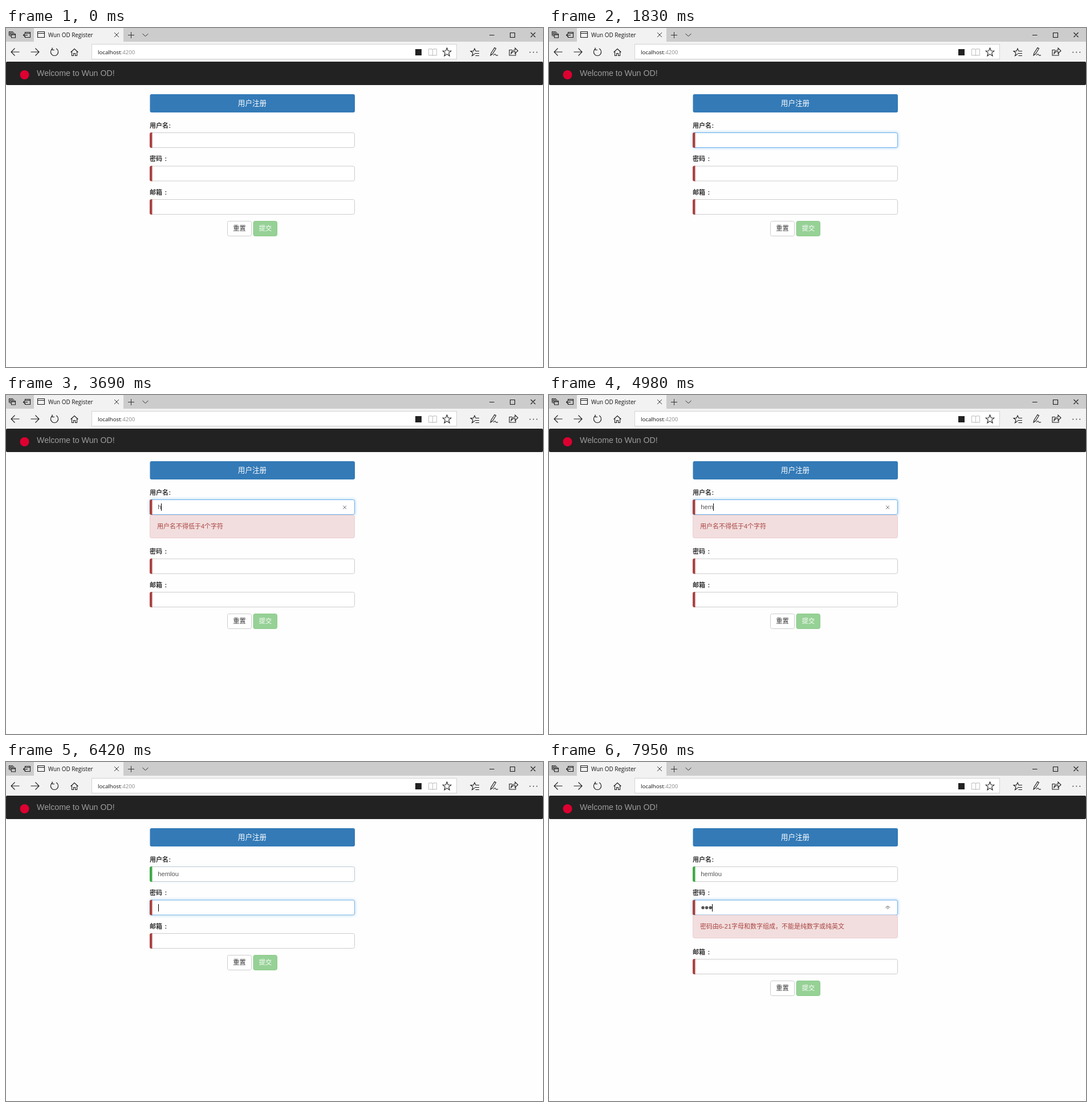
These frames come from a looping animation (942 px wide and 594 px high, 8 s). An HTML page:

```html
<!DOCTYPE html>
<html lang="zh-CN">
<head>
<meta charset="utf-8">
<title>Register form</title>
<style>
  html, body { margin: 0; width: 100%; height: 100%; overflow: hidden; background: #fefefe; }
  svg { display: block; width: 100%; height: 100%; }
  text { font: 11px "Liberation Sans", "Noto Sans CJK SC", "Noto Sans CJK", sans-serif; white-space: pre; }
  .ui { font-family: "Open Sans", "Noto Sans", sans-serif; }
  .mid { text-anchor: middle; }
  .label { font-weight: bold; fill: #333; }
  .icon { fill: none; stroke: #1c1c1c; stroke-width: 1.1; }
</style>
</head>
<body>
<svg viewBox="0 0 942 594" xmlns="http://www.w3.org/2000/svg">
  <defs>
    <filter id="blur" x="-5%" y="-50%" width="110%" height="200%"><feGaussianBlur stdDeviation="2"/></filter>
  </defs>

  <!-- browser chrome -->
  <rect width="942" height="24" fill="#ccc"/>
  <rect y="24" width="942" height="35" fill="#f2f2f2"/>
  <rect x="49" width="157" height="25" fill="#f2f2f2"/>
  <rect id="hover" x="908" y="24" width="34" height="35" fill="#dcdcdc"/>
  <rect x="150.500" y="28.500" width="640" height="26" fill="#fff" stroke="#d2d2d2"/>
  <text class="ui" x="74" y="16" style="font-size:9.9px" fill="#111">Wun OD Register</text>
  <text class="ui" x="161" y="45.500" style="font-size:9.700px" fill="#111">localhost<tspan fill="#8a8a8a">:4200</tspan></text>

  <g class="icon">
    <path d="M5.500 13.500v-7h7M7.500 15v-6.500h7M9.500 10.500h7v6.500h-7zM9.500 12h7"/>
    <path d="M33.500 10v-2.500h9v9h-9v-2.500M33.500 9.500h9M38 12.500h-7.500m2.500-2.500l-2.500 2.500 2.500 2.500"/>
    <path d="M55.500 6.500h12v10h-12zM55.500 9.500h12"/>
    <path d="M190 8l8 8m0-8l-8 8M214 12.500h11M219.500 7v11M239.500 10l5 4.500 5-4.500" stroke="#333" stroke-width="1"/>
    <path d="M848 12.500h8.500M884.500 8.500h8v8h-8zM920.500 8l8 8m0-8l-8 8"/>
    <path d="M23.500 42H9m6.500-6.500L9 42l6.500 6.500M43.500 42H58m-6.500-6.500L58 42l-6.500 6.500"/>
    <path d="M82 36a6.600 6.600 0 1 0 6 0M81 34.500v4h4"/>
    <path d="M113.500 42.500l6.500-6 6.500 6M115.500 41v7.500h3v-4h3v4h3V41"/>
    <path d="M748.500 37.500q-3-1.500-7-.5v11q4-1 7 .5 3-1.500 7-.5V37q-4-1-7 .5zv11" stroke="#c4c4c4"/>
    <path d="M773.500 35l2 5 5.300.3-4.100 3.400 1.400 5.200-4.600-3-4.600 3 1.400-5.200-4.100-3.400 5.300-.3z"/>
    <path d="M830 40.500h-6l-2-4.500-2 4.500h-5l4 3.300-1.500 5 4.500-3M822 44.500h8M823.500 48.500h6.500"/>
    <path d="M850 48l1-4 6-9.500 2.500 1.500-6 9.500zM855 48q3-4 4-1 1 2 4 .5"/>
    <path d="M888 38.500h-5v9.500h11v-4M886 45q0-6 7-6.500v-3.500l5 5-5 4.500v-3.500q-4-.5-7 4z"/>
  </g>
  <rect x="718" y="37" width="11" height="11" fill="#222"/>
  <path d="M918.500 42.500h1.600m4.400 0h1.600m4.400 0h1.600" stroke="#222" stroke-width="1.600"/>

  <!-- page header -->
  <rect y="59" width="942" height="41" rx="2" fill="#222"/>
  <circle cx="32.500" cy="82" r="8" fill="#dd0031"/>
  <text x="54" y="84" style="font-size:14.200px" fill="#9d9d9d">Welcome to Wun OD!</text>
  <rect x="252.500" y="116" width="359.500" height="32" rx="3" fill="#337ab7"/>
  <text class="mid" x="432" y="135.500" style="font-size:12.600px" fill="#fff">用户注册</text>

  <g id="form"></g>

  <g id="buttons">
    <rect x="388.500" y="338.500" width="42" height="26" rx="3" fill="#fff" stroke="#ccc"/>
    <text class="mid" x="409.500" y="355" style="font-size:11.200px" fill="#333">重置</text>
    <rect x="434" y="338.500" width="41.500" height="26" rx="3" fill="#96d196" stroke="#8bcb8b"/>
    <text class="mid" x="455" y="355" style="font-size:11.200px" fill="#fff">提交</text>
  </g>

  <g id="alert">
    <rect x="252.500" y=".5" width="359" height="40" rx="3" fill="#f2dede" stroke="#ebccd1"/>
    <text id="message" x="265" y="24" fill="#a94442"></text>
  </g>
  <text id="user" x="266.300" y="200" style="font-size:11.200px" fill="#555"></text>
  <g id="dots" fill="#555"></g>
  <path id="clear" d="M591.200 194l5.800 5.800m0-5.800l-5.800 5.800" stroke="#6c6c7c" stroke-width="1"/>
  <g id="eye" fill="none" stroke="#777" stroke-width=".9">
    <path d="M590 255.500q4-6 8.500 0"/><circle cx="594.200" cy="255.500" r="1.700"/>
  </g>
  <rect id="caret" width="1" height="13" fill="#000"/>
</svg>

<script>
const LOOP = 8000, SHIFT = 45;
const RED = [169, 68, 66], GREEN = [66, 169, 72], GREY = [204, 204, 204], BLUE = [102, 175, 233];

const typing = [
  [0, ''], [2010, 'h'], [2160, 'he'], [3240, 'hen'], [3420, 'he'], [3690, 'h'], [3840, ''],
  [4680, 'h'], [4770, 'he'], [4980, 'hem'], [5100, 'heml'], [5250, 'hemlo'], [5400, 'hemlou']
];
const secret = [[0, 0], [7410, 1], [7680, 2], [7950, 3]];
const blink = [
  [0, 0], [1290, 0], [1290, 1], [1650, 1], [1830, 0], [2010, 0], [2010, 1], [2520, 1], [2670, 0],
  [3000, 0], [3090, 1], [4200, 1], [4320, 0], [4680, 0], [4680, 1], [5700, 1], [5910, 0],
  [6240, 0], [6240, 1], [6690, 1], [6840, 0], [7200, 0], [7320, 1], [LOOP, 1]
];

const $ = id => document.getElementById(id);
const set = (el, attrs) => { for (const k in attrs) el.setAttribute(k, attrs[k]); return el; };
const add = (parent, tag, attrs) =>
  parent.appendChild(set(document.createElementNS('http://www.w3.org/2000/svg', tag), attrs));
const show = (id, on) => set($(id), { visibility: on ? 'visible' : 'hidden' });
const moveY = (el, y) => set(el, { transform: `translate(0 ${y})` });
const ramp = (t, a, b) => Math.min(1, Math.max(0, (t - a) / (b - a)));
const mix = (a, b, k) => `rgb(${a.map((v, i) => Math.round(v + (b[i] - v) * k))})`;
const lastIndex = (list, t) => {
  let i = list.length - 1;
  while (i > 0 && list[i][0] > t) i--;
  return i;
};
const stepAt = (list, t) => list[lastIndex(list, t)][1];
const lerpAt = (list, t) => {
  const i = lastIndex(list, t), [t0, v0] = list[i], [t1, v1] = list[i + 1] || list[i];
  return t1 > t0 ? v0 + (v1 - v0) * ramp(t, t0, t1) : v0;
};

function makeField(name, colonX, y) {
  const group = add($('form'), 'g', {});
  const label = add(group, 'text', { class: 'label', x: 252, y: y - 8.5 });
  label.textContent = name;
  add(label, 'tspan', { x: colonX }).textContent = ':';
  const box = { x: 252.5, y: y + 0.5, width: 359, height: 26, rx: 3 };
  const glow = add(group, 'rect', {
    ...box, fill: 'none', stroke: '#66afe9', 'stroke-width': 2.5, filter: 'url(#blur)', opacity: 0
  });
  const border = add(group, 'rect', { ...box, fill: '#fff', stroke: mix(GREY, BLUE, 0) });
  const bar = add(group, 'path', {
    d: `M256.500 ${y}h-1.500q-3 0-3 3v21q0 3 3 3h1.500z`, fill: mix(RED, GREEN, 0)
  });
  return { group, glow, border, bar };
}

const user = makeField('用户名', 285.500, 183);
const pass = makeField('密码', 278.500, 241.500);
const mail = makeField('邮箱', 278.500, 300);
const dots = [0, 1, 2].map(i => add($('dots'), 'circle', { cx: 270 + i * 6.600, cy: 255.300, r: 2.700 }));

function focus(field, k) {
  set(field.glow, { opacity: 0.6 * k });
  set(field.border, { stroke: mix(GREY, BLUE, k) });
}

function draw(t) {
  const name = stepAt(typing, t), count = stepAt(secret, t);
  const inPass = t >= 6240;
  const userError = t >= 2010 && t < 5100, passError = count > 0;

  show('hover', t >= 90 && t < 120);

  const swap = ramp(t, 6240, 6450);
  focus(user, ramp(t, 1290, 1440) - swap);
  focus(pass, swap);
  set(user.bar, { fill: mix(RED, GREEN, ramp(t, 5100, 5220)) });

  moveY(pass.group, userError ? SHIFT : 0);
  const low = userError || passError ? SHIFT : 0;
  moveY(mail.group, low);
  moveY($('buttons'), low);

  show('alert', low > 0);
  moveY($('alert'), passError ? 268 : 210);
  $('message').textContent = passError ? '密码由6-21字母和数字组成，不能是纯数字或纯英文'
    : name ? '用户名不得低于4个字符' : '用户名不能为空';

  $('user').textContent = name;
  show('clear', name && !inPass);
  show('eye', passError);
  dots.forEach((dot, i) => set(dot, { opacity: i < count ? 1 : 0 }));

  const textWidth = name ? $('user').getComputedTextLength() : 0;
  const caretX = inPass ? 267 + count * 6.600 : Math.max(267, 266.250 + textWidth);
  set($('caret'), { x: Math.floor(caretX), y: inPass ? 249 : 190, opacity: lerpAt(blink, t) });
}

const start = performance.now();
function tick() {
  draw((performance.now() - start) % LOOP);
  requestAnimationFrame(tick);
}
tick();
</script>
</body>
</html>
```
